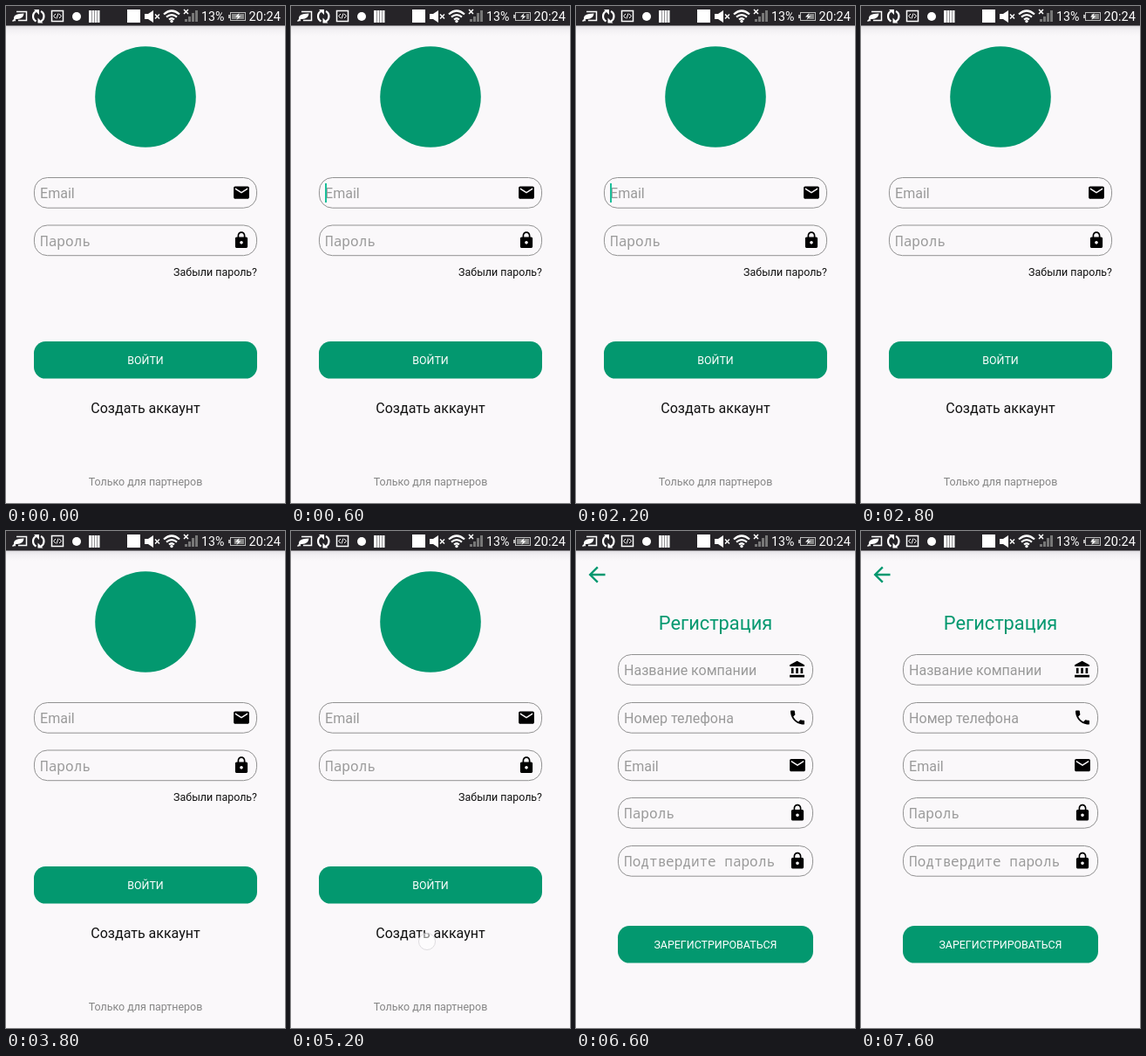
Recreate the animation shown at these times as an HTML page. Size 320 px wide and 569 px high, loop 8 s.

```html
<!DOCTYPE html>
<html lang="ru">
<head>
<meta charset="utf-8">
<title>Вход и регистрация</title>
<style>
  html, body { margin: 0; width: 100%; height: 100%; overflow: hidden; background: #faf8fa; }
  svg { display: block; width: 100vw; height: 100vh; }
  text { font-family: Roboto, sans-serif; }
  .mono { font-family: "Noto Sans Mono", "DejaVu Sans Mono", monospace; }
  .field { fill: none; stroke: #858585; stroke-width: .89; }
  .line { fill: none; stroke: #fff; stroke-width: 1.5; }
  .thin { stroke-width: 1; }
  .bold { stroke-width: 2.2; }
</style>
</head>
<body>
<svg id="stage" viewBox="0 0 320 569">
  <defs>
    <linearGradient id="shade" x2="0" y2="1">
      <stop offset="0" stop-color="#dedce0"/>
      <stop offset=".4" stop-color="#f1eff2"/>
      <stop offset="1" stop-color="#faf8fa"/>
    </linearGradient>
  </defs>
  <rect width="320" height="569" fill="#faf8fa"/>
  <rect y="22" width="320" height="12" fill="url(#shade)"/>
  <g id="login"></g>
  <g id="signup"></g>

  <g id="status">
    <rect width="320" height="22.500" fill="#262428"/>
    <!-- power saver -->
    <path class="line" d="M12 6.500H23.500V16.500H14M9 16.500H11"/>
    <path d="M9 15Q8 8.500 20.500 8.500Q20 15.500 11.500 15L8 18L7 17Z" fill="#fff"/>
    <!-- sync -->
    <path class="line bold" d="M34.500 6A6.500 6.500 0 0 0 34.500 17.500M40 6A6.500 6.500 0 0 1 40 17.500"/>
    <path d="M32 4H38V10ZM42.500 19.500H36.500V13.500Z" fill="#fff"/>
    <!-- code -->
    <rect class="line" x="52.500" y="5.500" width="13" height="12"/>
    <path class="line thin" d="M57 9L54.500 11.500L57 14M61 9L63.500 11.500L61 14M60 8.500L58 14.500"/>
    <circle cx="81" cy="12" r="5" fill="#fff"/>
    <path d="M95 5H98V19H95ZM98.500 5H101.500V19H98.500ZM102 5H104.500V19H102ZM105 5H107.500V19H105Z" fill="#fff"/>
    <rect x="139" y="4" width="15" height="15" fill="#fff"/>
    <!-- muted speaker -->
    <path d="M159 9H163L169 5V19L163 15H159Z" fill="#fff"/>
    <path class="line" d="M171 9.500L176 14.500M176 9.500L171 14.500"/>
    <!-- wifi -->
    <path class="line bold" d="M181 9.500Q190 1.500 199 9.500M184 12.700Q190 7.500 196 12.700M187 15.500Q190 13 193 15.500"/>
    <circle cx="190" cy="17.500" r="1.700" fill="#fff"/>
    <!-- signal -->
    <path d="M205 15H208V18H205ZM209 12H212V18H209ZM213 8H216V18H213ZM217 5H220V18H217Z" fill="#777"/>
    <path class="line" d="M204 4L209 9M209 4L204 9"/>
    <text x="224" y="17" font-size="14.200" fill="#fff">13%</text>
    <!-- battery -->
    <rect x="257.500" y="7.500" width="17" height="9" fill="none" stroke="#bbb"/>
    <rect x="255" y="10" width="2" height="4" fill="#bbb"/>
    <rect id="charge" y="9" height="6" fill="#888"/>
    <path d="M267.500 8L263 12.500H266L264.500 16L269.500 11.500H266.500Z" fill="#fff"/>
    <text x="278.500" y="17" font-size="14.600" fill="#fff">20:24</text>
  </g>
</svg>
<script>
const GREEN = '#03986f', HINT = '#999', LOOP = 8000;
const BODY = 16, SMALL = 12.44;
const $ = id => document.getElementById(id);

const ICONS = {
  mail: 'M20 4H4c-1.100 0-1.990.9-1.990 2L2 18c0 1.100.9 2 2 2h16c1.100 0 2-.9 2-2V6c0-1.100-.9-2-2-2zm0 4l-8 5-8-5V6l8 5 8-5v2z',
  lock: 'M18 8h-1V6c0-2.760-2.240-5-5-5S7 3.240 7 6v2H6c-1.100 0-2 .9-2 2v10c0 1.100.9 2 2 2h12c1.100 0 2-.9 2-2V10c0-1.100-.9-2-2-2zm-6 9c-1.100 0-2-.9-2-2s.9-2 2-2 2 .9 2 2-.9 2-2 2zm3.100-9H8.900V6c0-1.710 1.390-3.100 3.100-3.100s3.100 1.390 3.100 3.100v2z',
  phone: 'M6.620 10.790c1.440 2.830 3.760 5.140 6.590 6.590l2.200-2.200c.27-.27.67-.36 1.020-.24 1.120.37 2.330.57 3.570.57.55 0 1 .45 1 1V20c0 .55-.45 1-1 1-9.390 0-17-7.610-17-17 0-.55.45-1 1-1h3.500c.55 0 1 .45 1 1 0 1.250.2 2.450.57 3.570.11.35.03.74-.25 1.020l-2.200 2.200z',
  bank: 'M4 10v7h3v-7H4zm6 0v7h3v-7h-3zM2 22h19v-3H2v3zm14-12v7h3v-7h-3zm-4.500-9L2 6v2h19V6l-9.500-5z',
  back: 'M20 11H7.830l5.590-5.590L12 4l-8 8 8 8 1.410-1.410L7.830 13H20v-2z'
};

const icon = (name, cx, cy, scale = 0.889, fill = '#000') =>
  `<path d="${ICONS[name]}" fill="${fill}" transform="translate(${cx} ${cy}) scale(${scale}) translate(-12 -12)"/>`;

const label = (str, x, y, size, fill, anchor = 'middle', cls = '') =>
  `<text class="${cls}" x="${x}" y="${y}" font-size="${size}" fill="${fill}" text-anchor="${anchor}">${str}</text>`;

function field(x, cy, hint, name, cls) {
  const width = 320 - 2 * x;
  return `<rect class="field" x="${x + 0.45}" y="${cy - 17.5}" width="${width - 0.9}" height="34.700" rx="15"/>` +
    label(hint, x + 7.1, cy + 6, BODY, HINT, 'start', cls) +
    icon(name, 302 - x, cy - 0.4);
}

const button = (x, y, str) =>
  `<rect x="${x}" y="${y}" width="${320 - 2 * x}" height="42.600" rx="13.300" fill="${GREEN}"/>` +
  label(str, 160, y + 26, SMALL, '#fff');

$('login').innerHTML =
  `<circle cx="160" cy="104" r="57.800" fill="${GREEN}"/>` +
  field(32, 214, 'Email', 'mail') +
  field(32, 268.5, 'Пароль', 'lock', 'mono') +
  label('Забыли пароль?', 288, 309, SMALL, '#111', 'end') +
  button(32, 384, 'ВОЙТИ') +
  label('Создать аккаунт', 160, 466, BODY, '#111') +
  label('Только для партнеров', 160, 549, SMALL, '#858585') +
  '<rect id="caret" x="39" y="203" width="2" height="22" fill="#1cbf9a"/>' +
  '<circle id="touch" cx="156" cy="470" r="9.500" fill="#fff" fill-opacity=".5" stroke="#dfdde0"/>';

$('signup').innerHTML =
  icon('back', 24, 50, 1.19, GREEN) +
  label('Регистрация', 160, 113, 21.8, GREEN) +
  field(48, 159, 'Название компании', 'bank') +
  field(48, 214, 'Номер телефона', 'phone') +
  field(48, 268.5, 'Email', 'mail') +
  field(48, 323, 'Пароль', 'lock', 'mono') +
  field(48, 378, 'Подтвердите пароль', 'lock', 'mono') +
  button(48, 452, 'ЗАРЕГИСТРИРОВАТЬСЯ');

// Visible spans in ms
const CARET = [[200, 800], [1200, 1600], [2200, 2800], [3200, 3800], [4200, 4800]];
const TOUCH = [[5000, 5400]];
const SWITCH = 5400;

const show = (id, on) => $(id).setAttribute('visibility', on ? 'inherit' : 'hidden');
const during = (spans, t) => spans.some(([from, to]) => t >= from && t < to);

function draw(now) {
  const t = now % LOOP;
  show('login', t < SWITCH);
  show('signup', t >= SWITCH);
  show('caret', during(CARET, t));
  show('touch', during(TOUCH, t));
  // Charging level steps up once a second
  const level = Math.floor((t + 4400) / 1000) % 5;
  const width = 3 + level * 2.75;
  $('charge').setAttribute('x', 273 - width);
  $('charge').setAttribute('width', width);
}

const start = performance.now();
function tick() {
  draw(performance.now() - start);
  requestAnimationFrame(tick);
}
tick();
</script>
</body>
</html>
```
